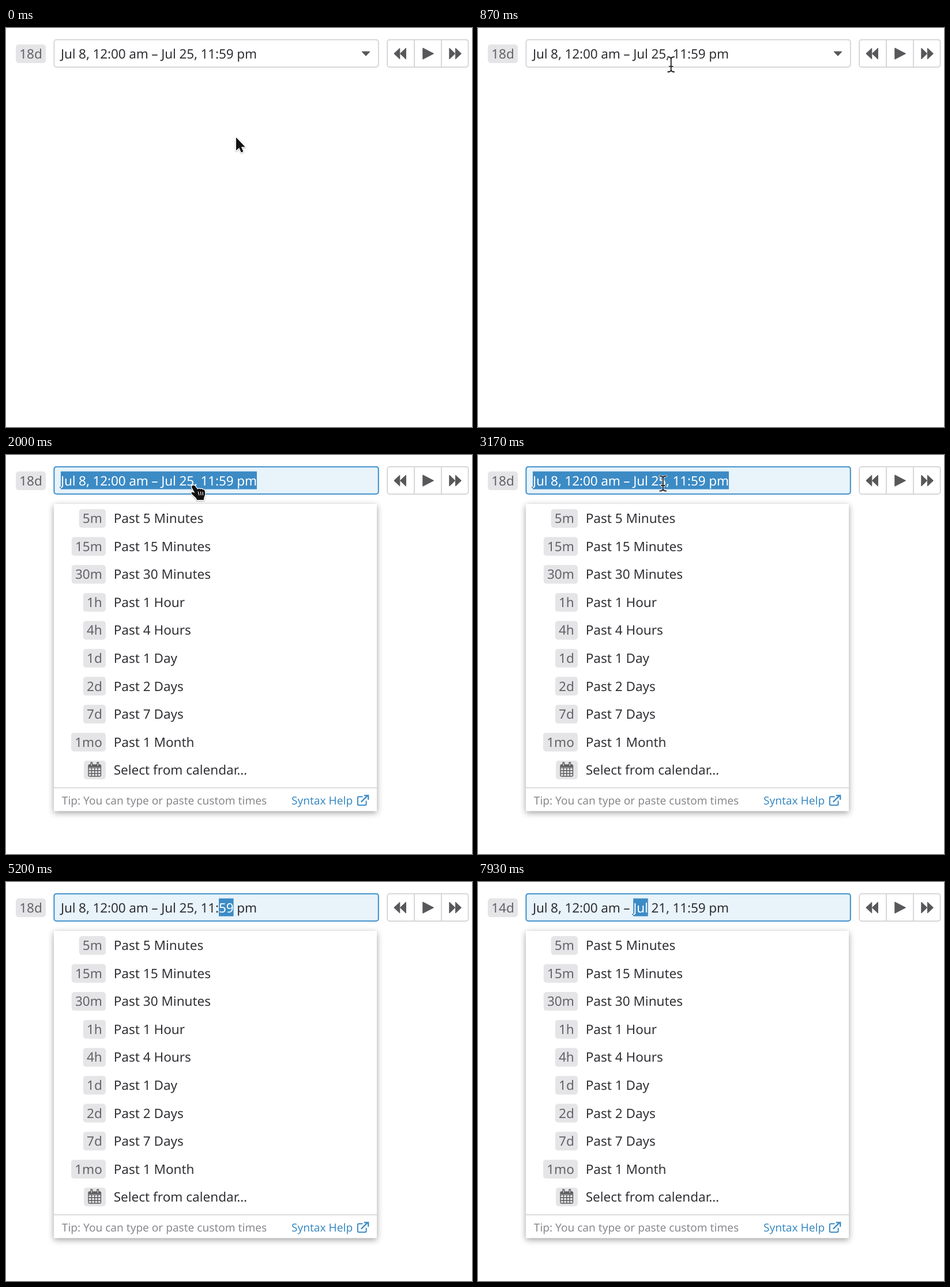
An HTML page that plays this animation: 808x693 px, repeating every 8000 ms.

```html
<!DOCTYPE html>
<html lang="en">
<head>
<meta charset="utf-8">
<title>Time range picker</title>
<style>
  html, body { margin: 0; width: 100%; height: 100%; overflow: hidden; background: #fff; }
  svg { display: block; width: 808px; height: 693px; }
  text {
    font: 22.54px "Noto Sans", "Open Sans", sans-serif;
    fill: #303035; white-space: pre; text-rendering: geometricPrecision;
  }
  .range { letter-spacing: -.13px; }
  .badge { fill: #e5e5e7; }
  .tag { fill: #636368; }
  .small { font-size: 19.07px; }
  .hint { fill: #89898e; }
  .link { fill: #3b8bc4; }
  .icon { fill: #58585b; stroke: #58585b; stroke-width: 1; stroke-linejoin: round; }
  .frame { fill: #fff; stroke: #d1d1d5; stroke-width: 1.7; }
  .line { fill: none; stroke: #d1d1d5; stroke-width: 1.7; }
  .panel { fill: #fff; filter: drop-shadow(0 3.5px 5.5px rgba(0, 0, 0, .38)); }
  .cursor { filter: drop-shadow(0 1.5px 1.2px rgba(0, 0, 0, .3)); }
  .solid { fill: #111; stroke: #fff; stroke-width: 2.6; stroke-linejoin: round; paint-order: stroke; }
</style>
</head>
<body>
<svg id="stage" viewBox="0 0 808 693">
  <clipPath id="selClip"><rect id="clipBox" y="28.5" height="31"/></clipPath>

  <rect class="badge" x="17" y="28.5" width="52" height="32.5" rx="5"/>
  <text id="days" class="tag" x="43" y="52.5" text-anchor="middle">18d</text>

  <rect id="field" class="frame" x="83.4" y="20.4" width="562.4" height="47.4" rx="4"/>
  <path id="arrowDown" class="icon" d="M617 41h14l-7 7.4z"/>
  <text id="range" class="range" x="94.9" y="52.5"></text>
  <rect id="selBox" y="28.5" height="31" fill="#3c8bc5"/>
  <g clip-path="url(#selClip)">
    <text id="rangeLit" class="range" x="94.9" y="52.5" style="fill:#fff"></text>
  </g>
  <rect id="caret" x="435" y="29" width="1.8" height="30" fill="#111"/>

  <rect class="frame" x="661.2" y="20.4" width="140.4" height="47.4" rx="4"/>
  <path class="line" d="M708 21v46M755 21v46"/>
  <path class="icon" d="M682.8 35v19l-10-9.5zM693.4 35v19l-10-9.5zM722.8 34.8v19.4l18.8-9.7zM768.8 35v19l10-9.5zM779.4 35v19l10-9.5z"/>

  <g id="menu">
    <rect class="panel" x="83" y="85" width="560" height="533.5"/>
    <g id="rows"></g>
    <rect class="badge" x="135" y="530.7" width="38" height="32.5" rx="5"/>
    <g fill="none" stroke="#58585b" stroke-width="1.4">
      <rect x="143" y="538" width="21.4" height="20" rx="2"/>
      <path d="M143 543.4h21.4M143 548.3h21.4M143 553.2h21.4M148.4 543.4v14.6M153.7 543.4v14.6M159 543.4v14.6"/>
      <path d="M143.5 540.4h20.4" stroke-width="3.4"/>
      <path d="M148.3 535v5.5M159.2 535v5.5" stroke-width="4" stroke-linecap="round"/>
      <path d="M148.3 535.3v4.8M159.2 535.3v4.8" stroke="#e5e5e7" stroke-width="1.3"/>
    </g>
    <path class="line" d="M83 578h560"/>
    <text class="small hint" x="96.8" y="606.8">Tip: You can type or paste custom times</text>
    <text class="small link" x="495" y="606.8">Syntax Help</text>
    <g fill="none" stroke="#3b8bc4" stroke-width="2">
      <path d="M618.5 593.5h-6.5q-2.2 0 -2.2 2.2v10.4q0 2.2 2.2 2.2h10.4q2.2 0 2.2 -2.2v-5.5"/>
      <path d="M615.8 602.6l11-11M620.8 591.4h7.4v7.4" stroke-width="2.3"/>
    </g>
  </g>

  <g id="pointer" class="cursor">
    <path class="solid" d="M0 0V22.8L5.2 17.9L8.8 26L12.4 24.5L8.9 16.4H15.6Z"/>
  </g>
  <g id="beam" fill="none" stroke-linecap="round">
    <path d="M-5.5-13q5.5 0 5.5 4V9q0 4-5.5 4M5.5-13q-5.5 0-5.5 4M0 9q0 4 5.5 4M-3 3.5h6" stroke="#fff" stroke-opacity=".75" stroke-width="4"/>
    <path d="M-5.5-13q5.5 0 5.5 4V9q0 4-5.5 4M5.5-13q-5.5 0-5.5 4M0 9q0 4 5.5 4M-3 3.5h6" stroke="#2a2a2c" stroke-width="2"/>
  </g>
  <g id="hand" class="cursor">
    <path class="solid" d="M-2.2 0Q-5 1-3.6 4L1.6 13Q-2.4 10.4-4.2 12Q-5.4 14-2.6 16L3.4 21.4L5 25H17L17.2 21Q20 16 18.8 10Q18 6 15.2 7.4Q13.6 4.8 11 6.4Q9 4.6 6.2 6.4L1.6 .8Q0-.9-2.2 0Z"/>
    <path d="M7.2 10.5l1.6 6.5M11.2 10.5l1 6.5M15 11l.4 6" stroke="#fff" stroke-width="1.1" fill="none"/>
  </g>
</svg>
<script>
const LOOP = 8000;
const PRESETS = [
  ["5m", "5 Minutes"], ["15m", "15 Minutes"], ["30m", "30 Minutes"],
  ["1h", "1 Hour"], ["4h", "4 Hours"], ["1d", "1 Day"],
  ["2d", "2 Days"], ["7d", "7 Days"], ["1mo", "1 Month"]
];
// [start ms, first character, end character]
const SELECTIONS = [
  [2000, 0, 34], [4070, 0, 0], [4700, 32, 34], [5200, 29, 31],
  [5530, 26, 28], [5830, 22, 24], [7930, 18, 21]
];
const DECREMENTS = [6600, 6800, 7030, 7300];

const $ = id => document.getElementById(id);
const show = (id, on) => { $(id).style.display = on ? "" : "none"; };
const clamp = v => Math.min(1, Math.max(0, v));
const mix = (a, b, k) => a + (b - a) * k;
const setText = (id, s) => { if ($(id).textContent !== s) $(id).textContent = s; };

function svgNode(name, attrs, parent) {
  const node = document.createElementNS("http://www.w3.org/2000/svg", name);
  for (const key in attrs) node.setAttribute(key, attrs[key]);
  return parent.appendChild(node);
}

function buildRows() {
  const rows = $("rows"), right = 173, pad = 6.2;
  const label = (s, y) => {
    svgNode("text", { x: 186.7, y: y + 8 }, rows).textContent = s;
  };
  PRESETS.forEach(([tag, name], i) => {
    const y = 110.2 + 48.55 * i;
    const box = svgNode("rect", { class: "badge", y: y - 16.2, height: 32.5, rx: 5 }, rows);
    const text = svgNode("text", { class: "tag", x: right - pad, y: y + 8, "text-anchor": "end" }, rows);
    text.textContent = tag;
    const w = text.getComputedTextLength() + 2 * pad;
    box.setAttribute("x", right - w);
    box.setAttribute("width", w);
    label("Past " + name, y);
  });
  label("Select from calendar…", 110.2 + 48.55 * 9);
}

function cursorAt(t) {
  if (t < 1230) {
    const u = clamp((t - 430) / 800);
    const k = 1 - Math.pow(1 - Math.pow(u, 1.4), 4.7);
    const y = mix(190, 54, k);
    return [y > 69 ? "pointer" : t < 930 ? "beam" : "hand", mix(399, 330, k), y];
  }
  if (t < 2030) {
    const dx = t < 1270 ? 4 : t < 1300 ? 3 : t < 1670 ? 2 : 0;
    return ["hand", 326 + dx, 53];
  }
  if (t < 4070) {
    const k = t < 3130 ? 0 : t < 3170 ? .35 : t < 3200 ? .75 : 1;
    return ["beam", mix(329, 318, k), mix(51, 49, k)];
  }
  return ["", 0, 0];
}

function drawCursor(t) {
  const [kind, x, y] = cursorAt(t);
  for (const id of ["pointer", "beam", "hand"]) show(id, id === kind);
  if (kind) $(kind).setAttribute("transform", `translate(${x} ${y})`);
}

function drawField(t, focused) {
  const hover = clamp((t - 900) / 100);
  const gray = [209, 209, 213].map(c => Math.round(mix(c, 130, hover)));
  const field = $("field");
  field.style.stroke = focused ? "#3c8dca" : `rgb(${gray})`;
  field.style.strokeWidth = focused ? 2 : mix(1.7, 2, hover);
  field.style.fill = focused ? "#e8f3fa" : "#fff";
  show("arrowDown", !focused);
}

function drawSelection(t) {
  const [, from, to] = SELECTIONS.filter(s => t >= s[0]).pop() || [0, 0, 0];
  const text = $("range");
  const x = text.getStartPositionOfChar(from).x;
  const width = to > from ? text.getEndPositionOfChar(to - 1).x - x : 0;
  for (const id of ["selBox", "clipBox"]) {
    $(id).setAttribute("x", x);
    $(id).setAttribute("width", width);
  }
}

function draw(t) {
  const focused = t >= 2000;
  const steps = DECREMENTS.filter(d => t >= d).length;
  const range = `Jul 8, 12:00 am – Jul ${25 - steps}, 11:59 pm`;
  setText("days", 18 - steps + "d");
  setText("range", range);
  setText("rangeLit", range);
  drawField(t, focused);
  show("menu", focused);
  show("caret", t >= 4070 && t < 4570);
  drawSelection(t);
  drawCursor(t);
}

function tick(now) {
  draw(now % LOOP);
  requestAnimationFrame(tick);
}

buildRows();
draw(0);
requestAnimationFrame(tick);
</script>
</body>
</html>
```
